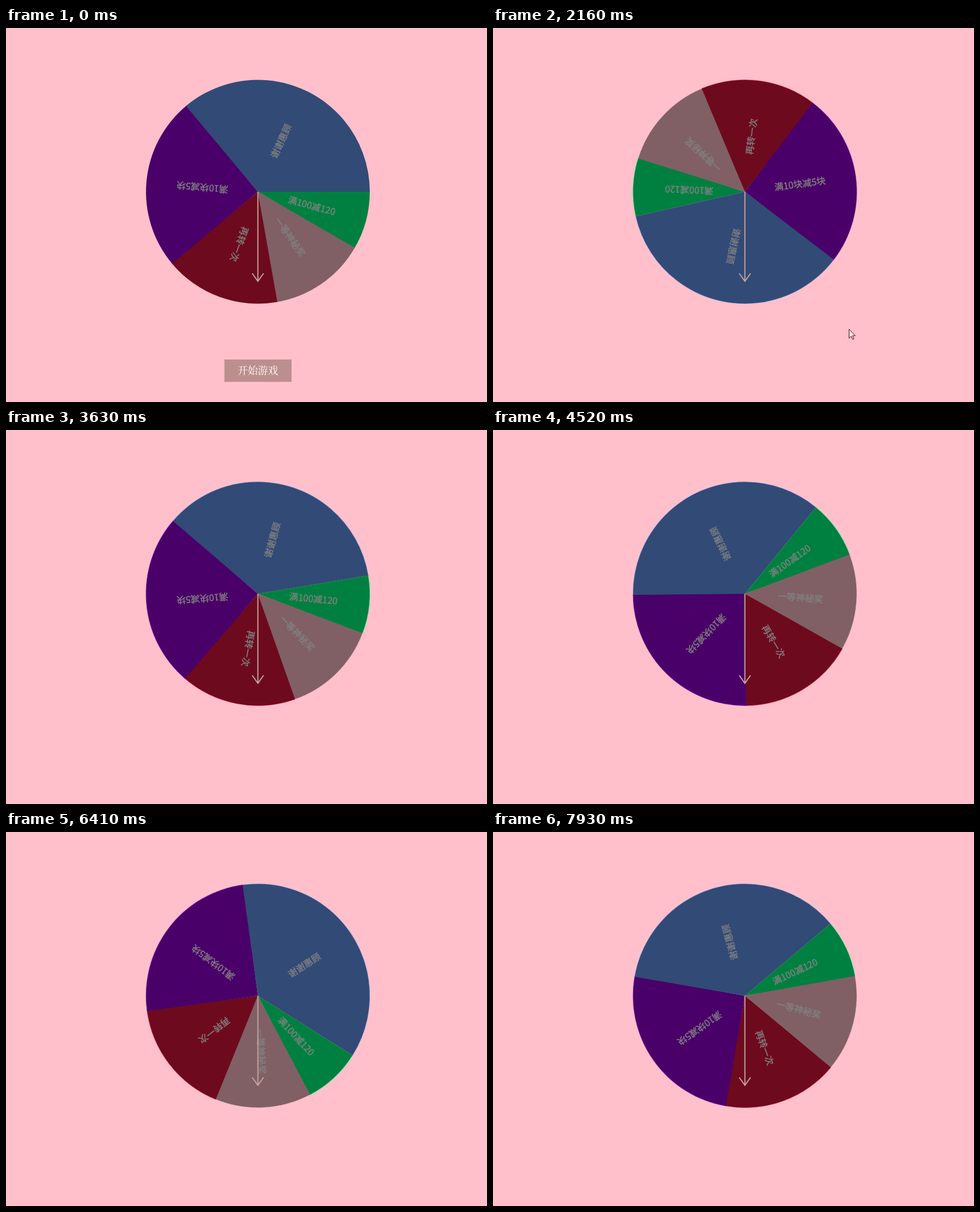
Recreate the animation shown at these times as an HTML page with a canvas. Size 849 by 660 pixels, loop 8 s.

```html
<!DOCTYPE html>
<html lang="zh">
<head>
<meta charset="utf-8">
<style>
  html, body { margin: 0; width: 100%; height: 100%; overflow: hidden; background: #ffc0cb; }
  canvas { display: block; }
</style>
</head>
<body>
<canvas id="stage" width="849" height="660"></canvas>
<script>
const ctx = document.getElementById('stage').getContext('2d');
const LOOP = 8000, CLICK = 890, TICK = 26.92;
const CX = 444.6, CY = 289, RADIUS = 197.5;
const SANS = '"Noto Sans CJK SC", "Noto Sans CJK", sans-serif';
const SERIF = '"Noto Serif CJK SC", "Noto Sans CJK SC", "Noto Sans CJK", serif';
const rad = degrees => degrees * Math.PI / 180;

// label, sweep in degrees, dimmed fill, bright rim
const sectors = [
  ['满100减120', 30, '#008040', '#00ff7f'],
  ['一等神秘奖', 50, '#806065', '#ffc0cb'],
  ['再转一次', 60, '#6e0a1e', '#dc143c'],
  ['满10块减5块', 90, '#4a0069', '#9400d3'],
  ['谢谢惠顾', 130, '#324a76', '#6495ed'],
];

// time, repaint count, wheel angle
const spin = [
  [0, 0, 0], [460, 0, 0], [CLICK, 6, 0], [2160, 24, 1967.3], [3630, 45, 4310.6],
  [4520, 58, 5709.4], [5640, 74, 7435.2], [7250, 97, 10043.5], [7930, 107, 11119.8], [LOOP, 107, 11119.8],
];

// time, x, y of the pointer tip
const pointer = [
  [460, 484, 655], [600, 470, 622], [740, 462, 602], [1880, 462, 602],
  [1950, 486, 590], [2020, 515, 574], [2090, 583, 553], [2160, 628, 531],
  [2230, 682, 503], [2370, 796, 437],
];

const segment = (keys, time) => {
  let i = 0;
  while (i < keys.length - 2 && time >= keys[i + 1][0]) i++;
  const [from, to] = [keys[i], keys[i + 1]];
  return [from, to, (time - from[0]) / (to[0] - from[0])];
};

// The wheel repaints about every 70 ms and turns by whole ticks.
function poseAt(time) {
  const [from, to, part] = segment(spin, time);
  const steps = to[1] - from[1];
  if (!steps) return { time: from[0], angle: from[2] };
  const done = Math.floor(part * steps + 0.05) / steps;
  const turn = to[2] - from[2];
  const ticks = Math.max(1, Math.round(turn / TICK));
  return {
    time: from[0] + done * (to[0] - from[0]),
    angle: from[2] + turn * Math.round(done * ticks) / ticks,
  };
}

function drawWheel(angle, spinning) {
  ctx.save();
  ctx.translate(CX, CY);
  ctx.rotate(rad(angle));
  let start = 0;
  for (const [label, sweep, fill, rim] of sectors) {
    const end = start + sweep;
    // A slight overlap hides the seam to the next sector.
    const cover = Math.min(end + 0.5, 360);
    ctx.beginPath();
    ctx.moveTo(0, 0);
    ctx.arc(0, 0, RADIUS, rad(start), rad(cover));
    ctx.fillStyle = fill;
    ctx.fill();
    if (spinning) {
      ctx.beginPath();
      ctx.arc(0, 0, RADIUS, rad(start), rad(end));
      ctx.globalAlpha = 0.5;
      ctx.strokeStyle = rim;
      ctx.lineWidth = 1;
      ctx.stroke();
      ctx.globalAlpha = 1;
    }
    start = end;
  }
  drawLabels();
  ctx.restore();
}

function drawLabels() {
  ctx.font = '16.1px ' + SANS;
  ctx.textAlign = 'center';
  ctx.textBaseline = 'alphabetic';
  ctx.fillStyle = ctx.strokeStyle = '#808080';
  ctx.lineWidth = 0.4;
  let start = 0;
  for (const [label, sweep] of sectors) {
    ctx.save();
    ctx.rotate(rad(start + sweep / 2));
    ctx.fillText(label, 98.2, 5.2);
    ctx.strokeText(label, 98.2, 5.2);
    ctx.restore();
    start += sweep;
  }
}

function drawArrow() {
  ctx.save();
  ctx.translate(CX, CY);
  ctx.strokeStyle = '#c4a29e';
  ctx.lineWidth = 2;
  ctx.stroke(new Path2D('M0 0V158M-10 144L0 158L10 144'));
  ctx.restore();
}

function drawButton() {
  ctx.fillStyle = '#bc8f8f';
  ctx.fillRect(385.5, 585, 118.5, 39.5);
  ctx.fillStyle = '#fff';
  ctx.font = '17.8px ' + SERIF;
  ctx.textAlign = 'center';
  ctx.textBaseline = 'alphabetic';
  ctx.fillText('开始游戏', CX, 611.3);
}

function drawPointer(time) {
  if (time < pointer[0][0] || time > pointer.at(-1)[0]) return;
  const [from, to, part] = segment(pointer, time);
  const mix = i => Math.round(from[i] + (to[i] - from[i]) * part);
  ctx.save();
  ctx.translate(mix(1) + 0.5, mix(2) + 0.5);
  const shape = new Path2D('M0 0V16L3.7 12.5L6.3 18L8.6 17L6.1 11.5H11Z');
  ctx.fillStyle = '#ffd9df';
  ctx.fill(shape);
  ctx.strokeStyle = '#301820';
  ctx.lineWidth = 1;
  ctx.stroke(shape);
  ctx.restore();
}

function draw(now) {
  const { time, angle } = poseAt(now % LOOP);
  ctx.fillStyle = '#ffc0cb';
  ctx.fillRect(0, 0, 849, 660);
  drawWheel(angle, angle > 0);
  drawArrow();
  if (time < CLICK) drawButton();
  drawPointer(time);
}

const begin = performance.now();
function loop() {
  draw(performance.now() - begin);
  requestAnimationFrame(loop);
}
loop();
</script>
</body>
</html>
```
